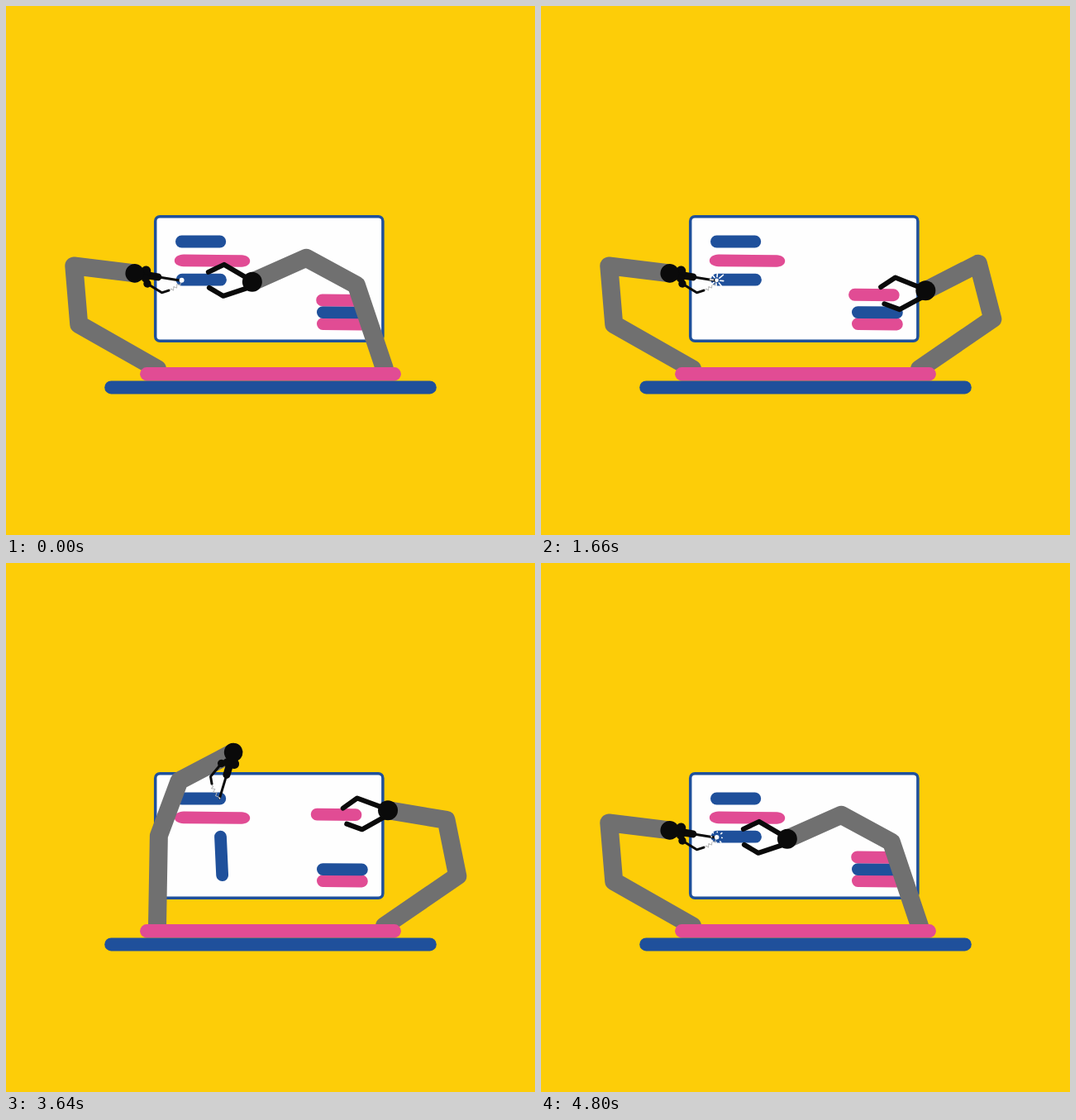
Write an HTML page that moves like this. It is 640 px wide and 640 px high and loops after 4820 ms.

```html
<!DOCTYPE html>
<html lang="en">
<head>
<meta charset="utf-8">
<title>Robot arms at a laptop</title>
<style>
  html, body { margin: 0; width: 100%; height: 100%; overflow: hidden; background: #fdcd08; }
  svg { display: block; width: 100%; height: 100%; }
  path, line, polyline { fill: none; stroke-linecap: round; stroke-linejoin: round; }
  .blue { stroke: #1f509b; }
  .pink { stroke: #e14c94; }
  .bar { stroke-width: 14.8; }
  .arm { stroke: #707070; stroke-width: 22; }
  .ink { stroke: #0a0a0a; }
  .dark { fill: #0a0a0a; }
</style>
</head>
<body>
<svg viewBox="0 0 640 640">
  <rect width="640" height="640" fill="#fdcd08"/>
  <rect x="180.7" y="254.7" width="275.2" height="150.6" rx="5.5" fill="#fefefe" stroke="#1f509b" stroke-width="3.5"/>

  <path class="blue bar" d="M212.4 285H258.8"/>
  <path fill="#e14c94" style="fill:#e14c94" d="M215 300.6L285 301.3C291 301.5 295.2 304.6 295.2 308.5S291 315.7 285 315.7L215 315.2C208 315 203.8 311.8 203.8 308S208 300.8 215 300.6Z"/>
  <g transform="translate(259.5 331.2)"><path id="hinge" class="blue bar" d="M0 0H-46.5"/></g>
  <path class="pink bar" d="M383.4 384.6L430.4 385"/>
  <path class="blue bar" d="M383.4 370.6L430.4 370.9"/>
  <path id="cargo" class="pink bar" d="M382.6 355.8L429.4 356.3"/>

  <polyline id="armL" class="arm"/>
  <g id="tool">
    <path class="ink" stroke-width="3" d="M0 28V58M-10 17L-18 36L-14 44"/>
    <path class="ink" stroke-width="9" d="M0 15V28.5"/>
    <path class="ink" stroke-width="8" d="M0 9V15"/>
    <path stroke="#b8b8b8" stroke-width="1" d="M-14 45.5L-11.5 46.5L-13 49.5L-8.5 49L-9.5 53L-5 52.5L-5.5 56.5L-1 57"/>
    <circle class="dark" cx="-10" cy="17" r="4.7"/>
    <circle class="dark" cx="5" cy="13" r="6"/>
    <circle class="dark" cx="-4" cy="14" r="5"/>
    <circle class="dark" r="11.3"/>
    <circle cy="58" r="1" fill="#fefefe"/>
  </g>
  <g id="sparks" transform="translate(212.6 331.8)" stroke="#fefefe">
    <circle id="core" fill="#fefefe" stroke="none"/>
    <path id="rays" stroke-width="1.6"/>
  </g>

  <polyline id="armR" class="arm"/>
  <g id="claw">
    <path id="upper" class="ink" stroke-width="6" d="M-5 -4L-34 -21L-53 -12"/>
    <path id="lower" class="ink" stroke-width="6" d="M-2 6L-35 17L-52 7"/>
    <circle class="dark" r="12"/>
  </g>

  <path class="pink" stroke-width="16.4" d="M170.3 445.3H469.7"/>
  <path class="blue" stroke-width="16" d="M127.2 461.4H512.8"/>
</svg>
<script>
const LOOP = 4820;
const el = id => document.getElementById(id);
const set = (id, name, value) => el(id).setAttribute(name, value);

// Poses: absolute angles of the three arm segments.
const L = { weld: [-150.4, -94.8, 7], reach: [-82, -59.2, -20.6], peek: [-64.4, -51.5, -27], back: [-146, -111.5, -29.3] };
const R = { hold: [-108.6, 208.4, 156], swing: [-34.4, 281, 216], stack: [-34.4, 255, 147], lift: [-34.4, 260, 207.3] };

// Left rows: time, pose, tool rotation.
const left = [
  [0, ...L.weld, -81], [1780, ...L.weld, -81],
  [2300, ...L.reach, 2], [2400, ...L.reach, 2],
  [2720, ...L.peek, 24], [3430, ...L.peek, 24],
  [4000, ...L.back, 0], [4330, ...L.back, 0],
  [4740, ...L.weld, -81], [LOOP, ...L.weld, -81]
];
// Right rows: time, pose, upper and lower finger rotation.
const right = [
  [0, ...R.hold, 0, 0], [600, ...R.hold, 0, 0], [710, ...R.hold, -5, -16],
  [1420, ...R.swing, -5, -16], [1550, ...R.stack, -3, -14],
  [1595, ...R.stack, -8, -10], [1920, ...R.lift, -11, -11],
  [3480, ...R.lift, -11, -11], [3920, ...R.stack, -8, -10],
  [4000, ...R.stack, -3, -13.5], [4060, ...R.stack, -3, -13.5],
  [4480, ...R.hold, -5, -16], [4560, ...R.hold, 0, 0], [LOOP, ...R.hold, 0, 0]
];
const hinge = [[3200, -90], [3300, -101], [3460, -84], [3610, -93], [3750, -90], [4440, -90], [4700, 0], [LOOP, 0]];
const FALL = 2920, GRAB = 1595, DROP = 3920;

const ease = p => (1 - Math.cos(Math.PI * p)) / 2;

function sample(rows, t) {
  let i = 0;
  while (i < rows.length - 2 && t >= rows[i + 1][0]) i++;
  const a = rows[i], b = rows[i + 1];
  const p = ease((t - a[0]) / (b[0] - a[0]));
  return a.slice(1).map((v, k) => v + (b[k + 1] - v) * p);
}

function chain(x, y, lengths, angles) {
  const pts = [[x, y]];
  lengths.forEach((len, i) => {
    const a = angles[i] * Math.PI / 180;
    pts.push([x += len * Math.cos(a), y += len * Math.sin(a)]);
  });
  return pts;
}
const leftArm = v => chain(183, 439, [109, 71, 74], v);
const rightArm = v => chain(458, 439, [107, 69, 71.5], v);
const rest = rightArm(R.stack)[3];

function hingeAngle(t) {
  if (t < FALL) return 0;
  if (t < 3200) return -90 * ((t - FALL) / (3200 - FALL)) ** 2;
  return sample(hinge, t)[0];
}

function drawSparks(t) {
  const on = t < 1700 || t > 4760;
  set('sparks', 'visibility', on ? 'visible' : 'hidden');
  if (!on) return;
  const s = t > 4760 ? t - LOOP + 200 : t;
  const p = (s % 200) / 200;
  set('core', 'r', 3 - 0.8 * Math.sin(Math.PI * p));
  const out = 3 + 7 * Math.sin(Math.PI * Math.min(1, p * 1.4) * 0.8);
  const inn = Math.min(out - 0.5, 3 + 4 * p);
  let d = '';
  if (p > 0.05) for (let i = 0; i < 8; i++) {
    const a = i * Math.PI / 4 + 0.1;
    const far = i % 2 ? out + 1 : out - 1;
    const c = Math.cos(a), n = Math.sin(a);
    d += `M${c * inn} ${n * inn}L${c * far} ${n * far}`;
  }
  set('rays', 'd', d);
}

function draw(t) {
  const l = sample(left, t), r = sample(right, t);
  const lp = leftArm(l), rp = rightArm(r);
  const hl = lp[3], hr = rp[3];
  set('armL', 'points', lp.join(' '));
  set('tool', 'transform', `translate(${hl}) rotate(${l[3]})`);
  set('armR', 'points', rp.join(' '));
  set('claw', 'transform', `translate(${hr})`);
  set('upper', 'transform', `rotate(${r[3]})`);
  set('lower', 'transform', `rotate(${r[4]})`);

  const held = t > GRAB && t < DROP;
  set('cargo', 'transform', held ? `translate(${hr[0] - rest[0]} ${hr[1] - rest[1]})` : '');
  set('hinge', 'transform', `rotate(${hingeAngle(t)})`);
  drawSparks(t);
}

const start = performance.now();
function tick(now) {
  draw(Math.max(0, now - start) % LOOP);
  requestAnimationFrame(tick);
}
draw(0);
requestAnimationFrame(tick);
</script>
</body>
</html>
```
